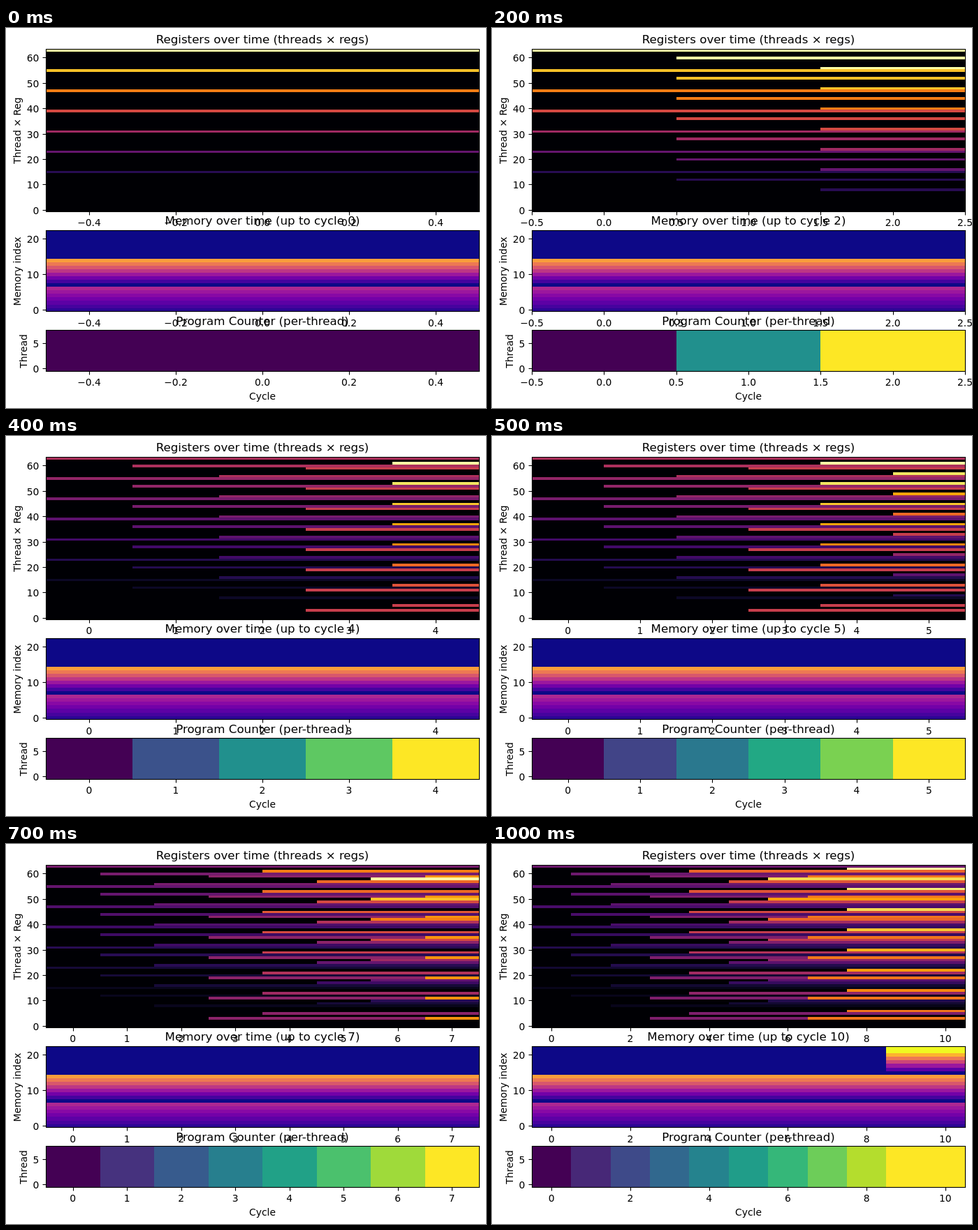
These frames come from a looping animation (687x545 px, 1100 ms). An HTML page with a canvas:

```html
<!DOCTYPE html>
<html lang="en">
<head>
<meta charset="utf-8">
<title>Thread registers, memory and program counter</title>
<style>
  html, body { margin: 0; width: 100%; height: 100%; overflow: hidden; background: #fff; }
  canvas { display: block; }
</style>
</head>
<body>
<canvas id="stage" width="687" height="545"></canvas>
<script>
const ctx = document.getElementById('stage').getContext('2d');
const LEFT = 57, WIDTH = 620, HEIGHT = 545;
const CYCLES = 11, STEP_MS = 100;

// Colour maps: evenly spaced stops, linear in between
const palette = stops => {
  const rgb = stops.split(' ').map(h => [0, 2, 4].map(i => parseInt(h.substr(i, 2), 16)));
  return v => {
    const p = Math.min(Math.max(v, 0), 1) * (rgb.length - 1);
    const i = Math.min(Math.floor(p), rgb.length - 2);
    return `rgb(${rgb[i].map((a, k) => Math.round(a + (rgb[i + 1][k] - a) * (p - i)))})`;
  };
};
const inferno = palette('000004 0c0826 240c4f 420a68 5d126e 781c6d 932667 ae305c c73e4c dd513a ed6925 f8850f fca50a fac62d f2e661 fcffa4');
const plasma = palette('0d0887 350498 5402a3 7000a8 8b0aa5 a31e9a b93289 cc4678 db5c68 e97158 f48849 fba139 febc2a fada24 f0f921');
const viridis = palette('440154 481a6c 472f7d 414487 39568c 31688e 2a788e 23888e 1f988b 22a884 35b779 54c568 7ad151 a5db36 d2e21b fde725');

// Each thread t runs: c[t] = a[t] + b[t], with a at 0, b at 8, c at 16
function register(row, cycle) {
  const t = row >> 3;
  const from = (start, value) => cycle >= start ? value : 0;
  return [
    from(2, t), from(5, 2 * t), from(6, 3 * t), from(7, 8) + from(3, 8),
    from(1, t), from(4, 8 + t), from(8, 16 + t), t
  ][row & 7];
}

function memory(row, cycle) {
  const address = row + 1, block = address >> 3;
  return block === 2 && cycle < 9 ? 0 : (block + 1) * (address & 7);
}

const counter = (row, cycle) => Math.min(cycle, 9);

const panels = [
  { top: 30.65, bottom: 263.59, frame: [30.5, 263.5], rows: 64, tick: 10, value: register, color: inferno,
    title: () => 'Registers over time (threads × regs)', label: 'Thread × Reg', labelX: 21 },
  { top: 290.77, bottom: 407.24, frame: [290.5, 406.5], rows: 23, tick: 10, value: memory, color: plasma, max: 18,
    title: c => `Memory over time (up to cycle ${c})`, label: 'Memory index', labelX: 21 },
  { top: 434.41, bottom: 492.65, frame: [433.5, 492.5], rows: 8, tick: 5, value: counter, color: viridis,
    title: () => 'Program Counter (per-thread)', label: 'Thread', labelX: 30 }
];

function text(str, x, y, align = 'center', size = 13.889) {
  ctx.font = `${size}px "DejaVu Sans", sans-serif`;
  ctx.textAlign = align;
  ctx.fillText(str, x, y);
}

function line(x1, y1, x2, y2) {
  ctx.beginPath();
  ctx.moveTo(x1, y1);
  ctx.lineTo(x2, y2);
  ctx.stroke();
}

function heatmap(p, cycle) {
  const cols = cycle + 1, rowH = (p.bottom - p.top) / p.rows;
  const edgeX = c => Math.round(LEFT + c * WIDTH / cols);
  const edgeY = r => Math.round(p.bottom - 0.6 - r * rowH);
  let max = p.max || 0;
  if (!max) {
    for (let r = 0; r < p.rows; r++) max = Math.max(max, p.value(r, cycle));
  }
  for (let r = 0; r < p.rows; r++) {
    for (let c = 0; c < cols; c++) {
      ctx.fillStyle = p.color(p.value(r, c) / (max || 1));
      ctx.fillRect(edgeX(c), edgeY(r + 1), edgeX(c + 1) - edgeX(c), edgeY(r) - edgeY(r + 1));
    }
  }
}

function axes(p, cycle) {
  const [top, bottom] = p.frame, cols = cycle + 1;
  ctx.fillStyle = ctx.strokeStyle = '#000';
  ctx.lineWidth = 1.11;
  ctx.strokeRect(LEFT + 0.5, top, WIDTH, bottom - top);

  const step = [0.2, 0.25, 0.5, 1, 2].find(s => s >= cols / 9);
  const digits = step === 0.25 ? 2 : step < 1 ? 1 : 0;
  for (let i = Math.ceil(-0.5 / step); i * step <= cols - 0.5; i++) {
    const x = LEFT + (i * step + 0.5) * WIDTH / cols, tx = Math.round(x) + 0.5;
    line(tx, bottom, tx, bottom + 5);
    text((i * step).toFixed(digits).replace('-', '−'), x, Math.round(p.bottom + 20.3));
  }

  const rowH = (p.bottom - p.top) / p.rows;
  for (let v = 0; v < p.rows; v += p.tick) {
    const y = p.bottom - (v + 0.5) * rowH;
    const ty = HEIGHT - Math.round(HEIGHT - y) - 0.5;
    line(LEFT - 4.5, ty, LEFT + 0.5, ty);
    text(v, 47.3, Math.round(y) + 5, 'right');
  }

  text(p.title(cycle), LEFT + WIDTH / 2, Math.round(p.top - 8.33), 'center', 16.667);
  ctx.save();
  ctx.translate(p.labelX, (p.top + p.bottom) / 2);
  ctx.rotate(-Math.PI / 2);
  text(p.label, 0, 0);
  ctx.restore();
}

function draw(cycle) {
  ctx.fillStyle = '#fff';
  ctx.fillRect(0, 0, 687, HEIGHT);
  for (const p of panels) {
    heatmap(p, cycle);
    axes(p, cycle);
  }
  text('Cycle', LEFT + WIDTH / 2, 533);
}

const start = performance.now();
function tick(now) {
  draw(Math.floor(Math.max(0, now - start) / STEP_MS) % CYCLES);
  requestAnimationFrame(tick);
}
tick(start);
</script>
</body>
</html>
```
